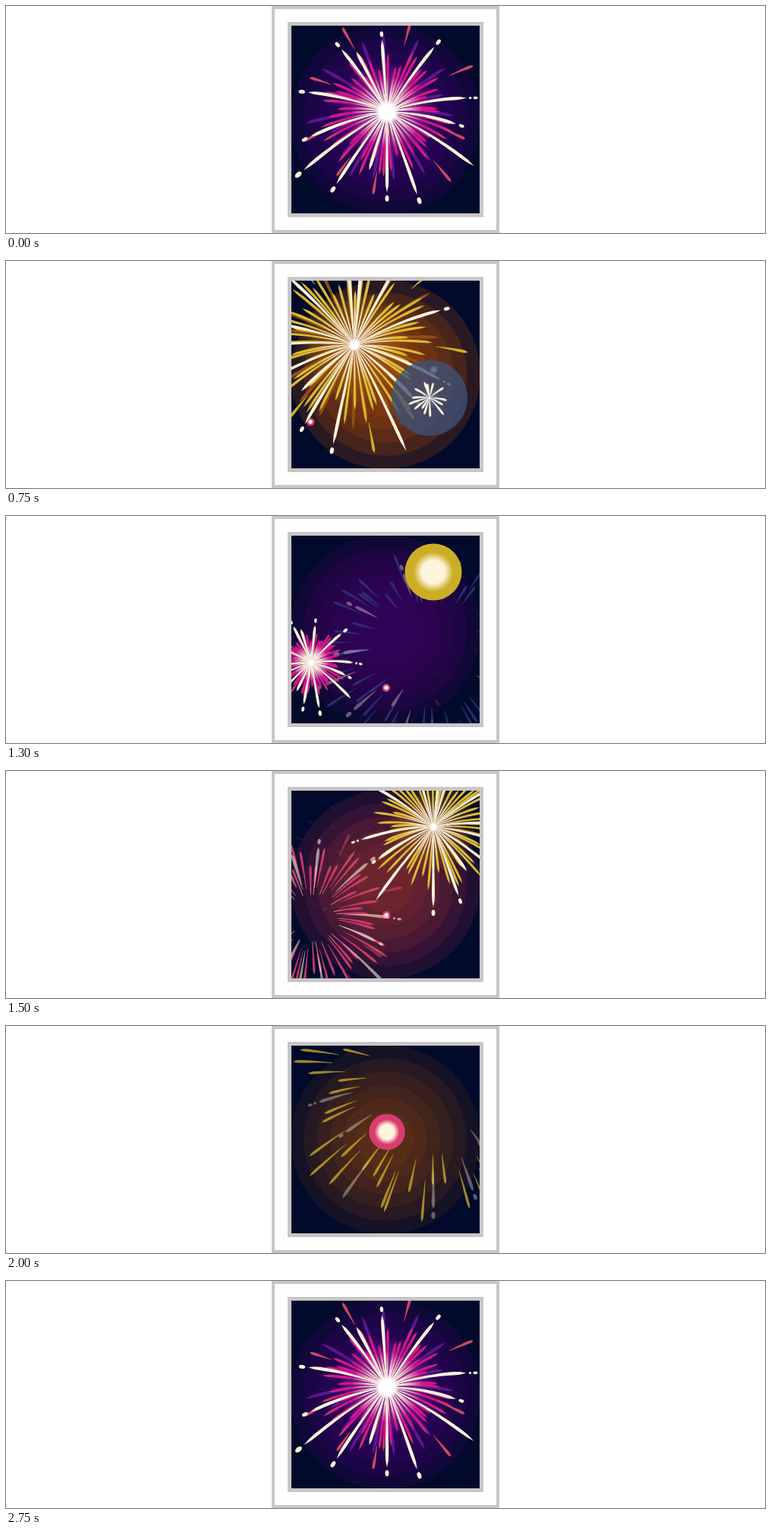
Animation, 1000 px wide and 300 px high, one loop 2.8 s. Source, as an HTML page with a canvas:

```html
<!DOCTYPE html>
<html lang="en">
<head>
<meta charset="utf-8">
<title>Fireworks</title>
<style>
  html, body { margin: 0; width: 100%; height: 100%; overflow: hidden; background: #fff; }
  .mat { position: absolute; left: 350px; top: 0; width: 300px; height: 300px; box-sizing: border-box; border: 4px solid #c9c6c7; background: #fefefe; }
  canvas { position: absolute; left: 17px; top: 17px; border: 5px solid #c9c6c7; display: block; }
</style>
</head>
<body>
<div class="mat"><canvas id="sky" width="248" height="248"></canvas></div>
<script>
const LOOP = 2800, STEP = 50, RAD = Math.PI / 180, MID_X = 124;
const ctx = document.getElementById('sky').getContext('2d');
const rgba = (c, a) => `rgba(${c.map(Math.round)},${a})`;
const clamp = v => Math.max(0, Math.min(1, v));
const polar = (deg, r) => [Math.cos(deg * RAD) * r, Math.sin(deg * RAD) * r];

let seed = 41;
const rnd = () => (seed = (seed * 16807) % 2147483647) / 2147483647;
const fan = (n, min, span) => Array.from({ length: n },
  (_, i) => polar((i + .6 * rnd()) * 360 / n, min + span * rnd()));

// every shell shares one pattern, turned and scaled
const ANGLES = [-94, -54, -10, 10, 32, 70, 90, 107, 125, 145, 162, 194, 234, 243];
const REACH = [96, 107, 107, 93, 136, 117, 107, 81, 117, 135, 107, 108, 103, 90];
const LONG = ANGLES.map((a, i) => polar(a, REACH[i]));
const BARE = [4, 7, 13], TWIN = 2;
const MID = fan(52, 56, 38), DARK = fan(19, 72, 38), LOOSE = fan(9, 108, 24);

const WHITE = [255, 255, 255], CREAM = [255, 244, 220];
const PINK = { mid: [214, 20, 140], tip: [208, 72, 102], dark: [92, 22, 142], halo: [255, 110, 210], flash: [216, 60, 112], air: [55, 0, 100], haze: .3, reach: 1 };
const GOLD = { mid: [220, 188, 50], tip: [208, 176, 40], dark: [150, 76, 18], halo: [200, 130, 40], flash: [204, 174, 38], air: [160, 70, 10], haze: .25, reach: 1.1 };
const BLUE = { mid: [48, 60, 140], tip: [48, 56, 132], dark: [40, 48, 120], halo: [130, 150, 200], flash: [62, 82, 122], air: [45, 0, 80], haze: .34, reach: 1.1 };

// rise: horizontal offset, height climbed, climbing time
const SHELLS = [
  { x: 126, y: 114, at: 1950, hue: PINK, size: 1, turn: 0, fade: [870, 1430], core: 11, rise: [-1, 87, 650] },
  { x: 83, y: 85, at: 250, hue: GOLD, size: 1.23, turn: 32, fade: [500, 1100], core: 6 },
  { x: 182, y: 155, at: 620, hue: BLUE, size: .93, turn: 18, fade: [420, 940], core: 6, rise: [0, 50, 320] },
  { x: 26, y: 168, at: 1100, hue: PINK, size: 1, turn: 10, fade: [300, 630], core: 6, rise: [-2, 64, 800] },
  { x: 187, y: 48, at: 1210, hue: GOLD, size: 1.23, turn: 160, flip: true, fade: [450, 1130], core: 5, rise: [1, 194, 910] }
];

function disc(x, y, r, fill) {
  ctx.fillStyle = fill;
  ctx.beginPath();
  ctx.arc(x, y, r, 0, 7);
  ctx.fill();
}

function radial(r, stops) {
  const g = ctx.createRadialGradient(0, 0, 0, 0, 0, r);
  stops.forEach(([p, c, a]) => g.addColorStop(p, rgba(c, a)));
  return g;
}

function place({ turn, flip }, [x, y], s) {
  const a = Math.atan2(y, x) / RAD;
  return polar(turn + (flip ? -a : a), Math.hypot(x, y) * s);
}

// tapered spark along an arc that sags under gravity
function spark([x, y], from, w) {
  const cx = x / 2, cy = y / 2 - Math.abs(x) * .08, left = [], right = [];
  for (let i = 0; i <= 12; i++) {
    const k = i / 12, t = from + (1 - from) * k;
    const px = 2 * t * (1 - t) * cx + t * t * x, py = 2 * t * (1 - t) * cy + t * t * y;
    const dx = (1 - t) * cx + t * (x - cx), dy = (1 - t) * cy + t * (y - cy);
    const h = w / 2 * Math.min(1, .12 + k) * Math.sqrt(1 - k ** 8) / (Math.hypot(dx, dy) || 1);
    left.push([px - dy * h, py + dx * h]);
    right.unshift([px + dy * h, py - dx * h]);
  }
  ctx.beginPath();
  left.concat(right).forEach(p => ctx.lineTo(...p));
  ctx.fill();
  return Math.atan2(y - cy, x - cx);
}

function bead([x, y], a, gap, len) {
  ctx.beginPath();
  ctx.ellipse(x + Math.cos(a) * gap, y + Math.sin(a) * gap, len, Math.max(1.6, len * .6), a, 0, 7);
  ctx.fill();
}

function flash(color, age) {
  const r = 50 * (age / 130) ** .78, a = clamp((200 - age) / 90);
  const core = clamp((130 - age) / 40);
  disc(0, 0, r, rgba(color, a));
  if (core) disc(0, 0, r * .7, radial(r * .7, [[0, CREAM, core], [.58, CREAM, core], [1, CREAM, 0]]));
}

function sparks(shell, grow, u) {
  const { hue, size, core } = shell;
  const s = (grow + .35 * u) * size, thin = .6 + .4 * grow;
  const hole = Math.min(.95, 1.4 * u), start = Math.max(.04, hole);
  const alpha = 1 - u * u, lit = clamp(1 - u * 4);
  const early = clamp((grow - .25) / .2), late = clamp((grow - .8) / .13);
  const body = hue.mid.map((v, i) => v + (hue.tip[i] - v) * clamp(u * 2.5));

  if (lit) disc(0, 0, 66 * s, radial(66 * s, [[0, hue.halo, .8 * lit], [.4, hue.halo, .45 * lit], [1, hue.halo, 0]]));

  ctx.fillStyle = rgba(hue.dark, late * (1 - u) ** 4);
  DARK.forEach(p => spark(place(shell, p, s), start, 5));

  ctx.fillStyle = radial(105 * s, [[0, WHITE, alpha * early], [.2, CREAM, alpha * early],
    [.45, body, alpha * early], [.65, body, alpha * early], [.9, hue.tip, alpha * early]]);
  MID.forEach(p => spark(place(shell, p, s * hue.reach * (1 + .8 * u)), start, 4.2 * thin));

  ctx.fillStyle = rgba(hue.tip, alpha * late);
  LOOSE.forEach(p => spark(place(shell, p, s), Math.max(.72, hole), 4.5));

  ctx.fillStyle = rgba(CREAM, (1 - u) ** 1.5);
  LONG.forEach((tip, i) => {
    const p = place(shell, tip, s), a = spark(p, start, 5.2 * thin);
    if (!early || BARE.includes(i)) return;
    if (i === TWIN) {
      bead(p, a, 5 * thin, 1.7 * thin);
      bead(p, a, 12 * thin, 3 * thin);
    } else {
      const len = REACH[i] / 26 * thin;
      bead(p, a, len + 4 * thin, len);
    }
  });

  if (lit) {
    const r = core * 1.5 * grow;
    disc(0, 0, r, radial(r, [[0, WHITE, lit], [.62, WHITE, lit], [1, WHITE, 0]]));
  }
}

const fadeOf = ({ fade: [from, to] }, age) => clamp((age - from) / (to - from));

function burst(shell, age) {
  const u = fadeOf(shell, age), grow = 1 - Math.exp((90 - age) / 150);
  if (u >= 1) return;
  ctx.save();
  ctx.translate(shell.x, shell.y);
  if (age < 200) flash(shell.hue.flash, age);
  if (grow > .05) sparks(shell, grow, u);
  ctx.restore();
}

// the whole sky takes on the colour of a burst, in stepped rings
function haze(shell, age) {
  const wait = shell.fade[0], { air, haze } = shell.hue;
  const a = haze * clamp((age - .4 * wait) / (.5 * wait)) * (1 - fadeOf(shell, age));
  if (a <= 0) return;
  for (let r = 125; r > 30; r -= 17.5) disc(MID_X, MID_X, r, rgba(air, a));
}

function rocket({ x, y, at, hue, rise }, t) {
  const left = at - t;
  if (!rise || left <= 0) return;
  const [dx, drop, span] = rise, k = left / span, py = y + drop * k ** 1.5;
  disc(x + dx * k, py, 5.2, rgba(hue === BLUE ? [120, 140, 178] : hue.flash, 1));
  disc(x + dx * k, py, 2.7, '#fff8ee');
}

function draw(t) {
  ctx.fillStyle = '#010a2a';
  ctx.fillRect(0, 0, 248, 248);
  const queue = SHELLS.map(s => [s, (t - s.at + LOOP) % LOOP]).sort((p, q) => q[1] - p[1]);
  queue.forEach(([s, age]) => haze(s, age));
  SHELLS.forEach(s => rocket(s, t));
  queue.forEach(([s, age]) => burst(s, age));
}

function tick() {
  draw(Math.floor(performance.now() % LOOP / STEP) * STEP);
  requestAnimationFrame(tick);
}
tick();
</script>
</body>
</html>
```
